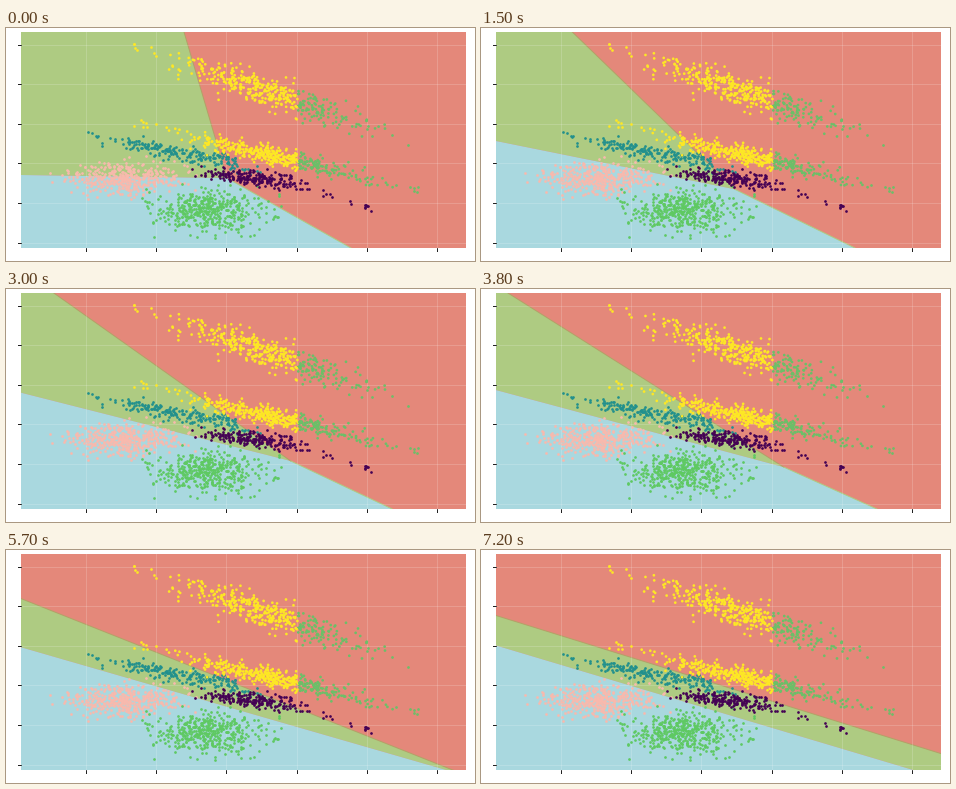
Recreate the animation shown at these times as a matplotlib script. Size 469 by 233 pixels, loop 7.3 s.

```python
import numpy as np
import matplotlib.pyplot as plt
from matplotlib.animation import FuncAnimation
from matplotlib.patches import Polygon, Rectangle

W, H, DPI = 469, 233, 100
PX = 72 / DPI
FRAMES, STEP = 73, 100
LEFT, RIGHT, TOP, BOTTOM = 15, 460, 4, 220
PIVOT = 210
SPLIT = 292
FAR = -400

RED, GREEN, BLUE = "#e4887a", "#aecb82", "#a9d8df"
YELLOW, TEAL, PURPLE, PINK = "#fde725", "#21908d", "#440154", "#f8b9ad"
LEAF, MOSS = "#5ec962", "#6cbf68"

rng = np.random.default_rng(7)

fig = plt.figure(figsize=(W / DPI, H / DPI), dpi=DPI, facecolor="white")
ax = fig.add_axes([0, 0, 1, 1])
ax.set_xlim(0, W)
ax.set_ylim(H, 0)
ax.axis("off")

plot_area = Rectangle((LEFT, TOP), RIGHT - LEFT, BOTTOM - TOP, fc=RED, lw=0, zorder=0)
ax.add_patch(plot_area)


def add_region(color, z):
    patch = Polygon([(0, 0), (1, 0), (1, 1)], fc=color, lw=0, zorder=z)
    ax.add_patch(patch)
    patch.set_clip_path(plot_area)
    return patch


def add_seam(color):
    line, = ax.plot([], [], color=color, lw=PX, zorder=3)
    line.set_clip_path(plot_area)
    return line


def draw_axes():
    grid = dict(color="white", alpha=0.17, lw=PX, zorder=4)
    tick = dict(color="#222222", lw=PX)
    for k in range(6):
        x = 79.8 + 70.25 * k
        y = 16.6 + 39.6 * k
        ax.plot([x, x], [TOP, BOTTOM], **grid)
        ax.plot([x, x], [BOTTOM, BOTTOM + 3], **tick)
        ax.plot([LEFT, RIGHT], [y, y], **grid)
        ax.plot([LEFT - 3, LEFT], [y, y], **tick)


def cluster(n, center, sx, sy, slope, lo, hi):
    """Tilted Gaussian cloud limited to lo..hi in x."""
    dx = rng.normal(0, sx, n)
    x = center[0] + dx
    y = center[1] + slope * dx + rng.normal(0, sy, n)
    keep = (x > lo) & (x < hi)
    return x[keep], y[keep]


def tail(n, start, end, sy):
    """Sparse points along a segment."""
    u = rng.random(n)
    x = start[0] + u * (end[0] - start[0])
    y = start[1] + u * (end[1] - start[1]) + rng.normal(0, sy, n)
    return x, y


def dots(points, color):
    ax.scatter(*points, s=(2.7 * PX) ** 2, c=color, lw=0, zorder=5)


def split_dots(points):
    dots(points, np.where(points[0] > SPLIT, MOSS, YELLOW))


green = add_region(GREEN, 1)
blue = add_region(BLUE, 2)
upper_seam = add_seam("#b5a067")
lower_seam = add_seam(GREEN)
draw_axes()

dots(cluster(400, (122, 151), 30, 8, 0, 35, 190), PINK)
dots(cluster(430, (203, 182), 28, 9.5, 0, 95, 290), LEAF)
dots(cluster(210, (180, 126), 41, 4, 0.2, 80, 255), TEAL)
split_dots(cluster(420, (262, 64), 47, 7.5, 0.32, 160, 380))
split_dots(cluster(440, (266, 128), 46, 4.5, 0.23, 155, 400))
dots(tail(7, (115, 13), (165, 31), 3), YELLOW)
dots(tail(7, (114, 91), (158, 102), 3), YELLOW)
dots(tail(6, (360, 100), (405, 113), 5), MOSS)
dots(tail(6, (390, 159), (442, 167), 2), MOSS)
dots(cluster(210, (247, 150), 29, 3.6, 0.13, 182, 300), PURPLE)
dots(tail(18, (290, 157), (374, 183), 3), PURPLE)


def ease(t, start, length):
    u = np.clip((t - start) / length, 0, 1)
    return u * u * (3 - 2 * u)


def boundaries(t):
    """Upper and lower lines, and where the third one leaves the plot."""
    angle = 73.6 - 13.8 * np.log1p(5 * min(t, 6.5)) - 7.9 * ease(t, 4.6, 1.8)
    pivot_y = 119 - 6.4 * np.exp(-t / 0.4) + 7 * ease(t, 3.5, 1.8)
    settled = t / (t + 1.13)
    lower_y = 147 - 59.6 * settled
    lower_slope = 0.015 + 0.328 * settled
    exit_x = 345 + 25 * (1 - np.exp(-t / 0.25)) + 1.8 * t * t
    return (pivot_y, np.tan(np.radians(angle))), (lower_y, lower_slope), exit_x


def update(frame):
    (pivot_y, up_slope), (lower_y, low_slope), exit_x = boundaries(frame * STEP / 1000)

    def upper(x):
        return pivot_y + up_slope * (x - PIVOT)

    def lower(x):
        return lower_y + low_slope * (x - LEFT)

    meet_x = PIVOT + (lower(PIVOT) - pivot_y) / (up_slope - low_slope)
    meet = (meet_x, lower(meet_x))
    end = (max(exit_x, meet_x), max(BOTTOM, meet[1]))
    up_far, low_far = (FAR, upper(FAR)), (FAR, lower(FAR))

    green.set_xy([up_far, meet, low_far])
    blue.set_xy([low_far, meet, end, (end[0], 3000), (FAR, 3000)])
    upper_seam.set_data(*zip(up_far, meet))
    lower_seam.set_data(*zip(meet, end))
    return green, blue, upper_seam, lower_seam


anim = FuncAnimation(fig, update, frames=FRAMES, interval=STEP, repeat=True,
                     repeat_delay=0, blit=False)
plt.show()
```
